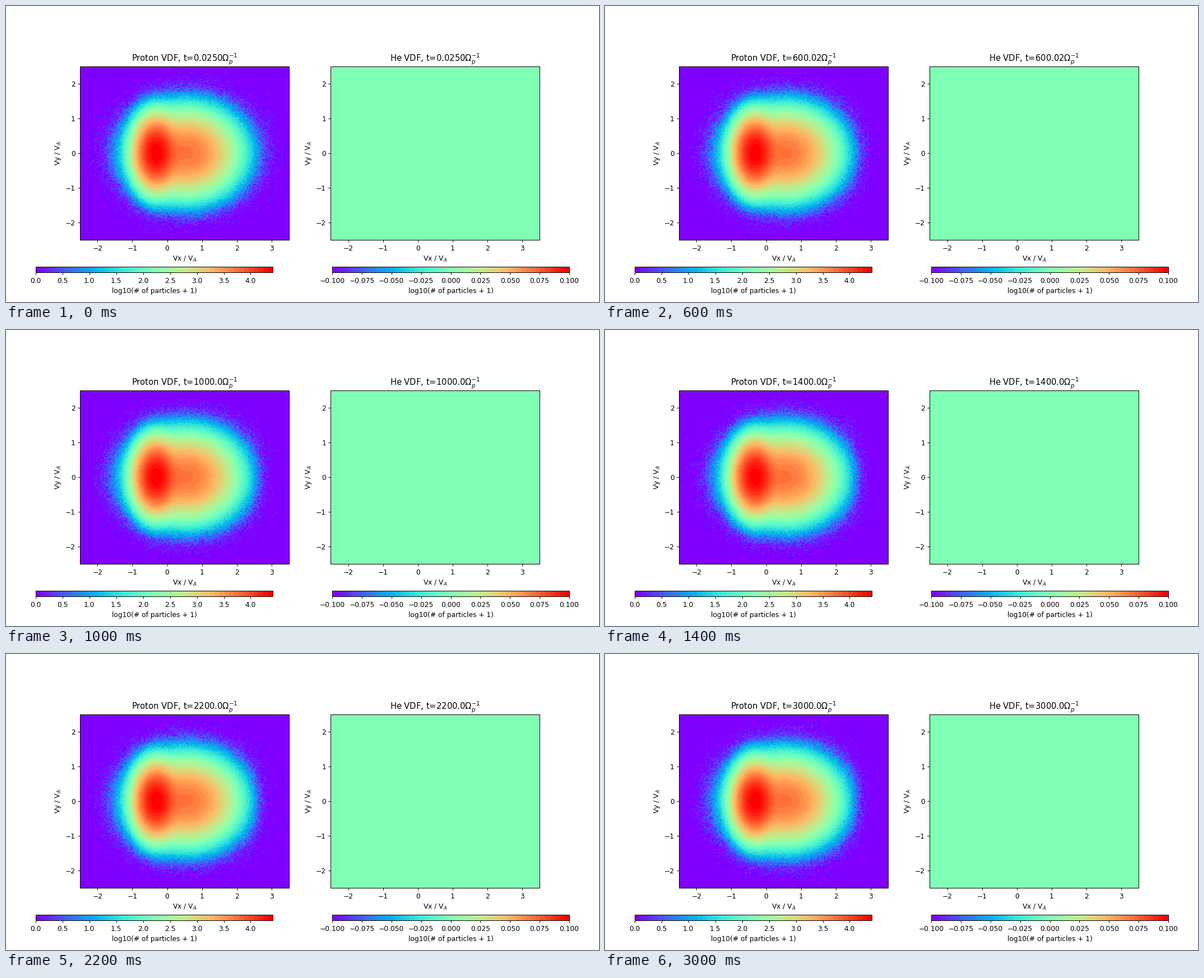
Write a matplotlib script that moves like this. It is 1058 px wide and 529 px high and loops after 3.2 s.

```python
import numpy as np
import matplotlib.pyplot as plt
from matplotlib.animation import FuncAnimation

DPI = 1058 / 12
FRAMES, STEP_MS = 16, 200
VMAX = 4.413
EXTENT = (-2.5, 3.5, -2.5, 2.5)
BINS = 200

plt.rcParams["font.family"] = "DejaVu Sans"
cmap = plt.get_cmap("rainbow", 49)

vx = np.linspace(-2.5, 3.5, BINS, endpoint=False) + 3 / BINS
vy = np.linspace(-2.5, 2.5, BINS, endpoint=False) + 2.5 / BINS
X, Y = np.meshgrid(vx, vy)


def gauss(peak, x0, sx, sy):
    return peak * np.exp(-((X - x0) / sx) ** 2 / 2 - (Y / sy) ** 2 / 2)


core = gauss(24000, -0.32, 0.247, 0.40)
beam = gauss(5250, 0.55, 0.57, 0.475)


def histogram(i):
    """Log counts: a steady core plus a beam whose fast edge steepens."""
    rng = np.random.default_rng(100 + i)
    steep = 2.4 * (1 - np.exp(-i / 5))
    cut = 10 ** (-steep * np.clip(X - 2.25, 0, 0.9) ** 2)
    return np.log10(rng.poisson(core + beam * cut) + 1)


def title(species, i):
    t = f"{0.025 + 200 * i:.4f}"[:6]
    return f"{species} VDF, t={t}" + r"$\Omega_p^{-1}$"


def panel(left, data, vmin, vmax, bar_left, ticks, fmt):
    width = 0.775 / 2.2
    height = width * 2 * 5 / 6
    ax = fig.add_axes([left, 0.5025 - height / 2, width, height])
    im = ax.imshow(data, cmap=cmap, vmin=vmin, vmax=vmax, extent=EXTENT,
                   origin="lower", interpolation="nearest", aspect="auto")
    ax.set_xticks(range(-2, 4))
    ax.set_yticks(range(-2, 3))
    ax.set_xlabel("Vx / V$_A$")
    ax.set_ylabel("Vy / V$_A$")
    cax = fig.add_axes([bar_left, 0.1, 0.4, 0.02])
    bar = fig.colorbar(im, cax=cax, orientation="horizontal",
                       ticks=ticks, format=fmt)
    bar.set_label("log10(# of particles + 1)")
    return ax, im


fig = plt.figure(figsize=(12, 6), dpi=DPI, facecolor="white")
ax_p, im_p = panel(0.125, histogram(0), 0, VMAX, 0.05,
                   np.arange(0, 4.1, 0.5), "%.1f")
ax_he, im_he = panel(0.125 + 0.775 * 1.2 / 2.2, np.zeros((BINS, BINS)),
                     -0.1, 0.1, 0.55,
                     np.round(np.arange(-4, 5) * 0.025, 3),
                     lambda v, _: f"{v:.3f}".replace("-", "\u2212"))


def draw(i):
    im_p.set_data(histogram(i))
    ax_p.set_title(title("Proton", i))
    ax_he.set_title(title("He", i))
    return im_p, ax_p.title, ax_he.title


anim = FuncAnimation(fig, draw, frames=FRAMES, interval=STEP_MS,
                     init_func=lambda: draw(0), repeat=True, repeat_delay=0,
                     blit=False)
plt.show()
```
